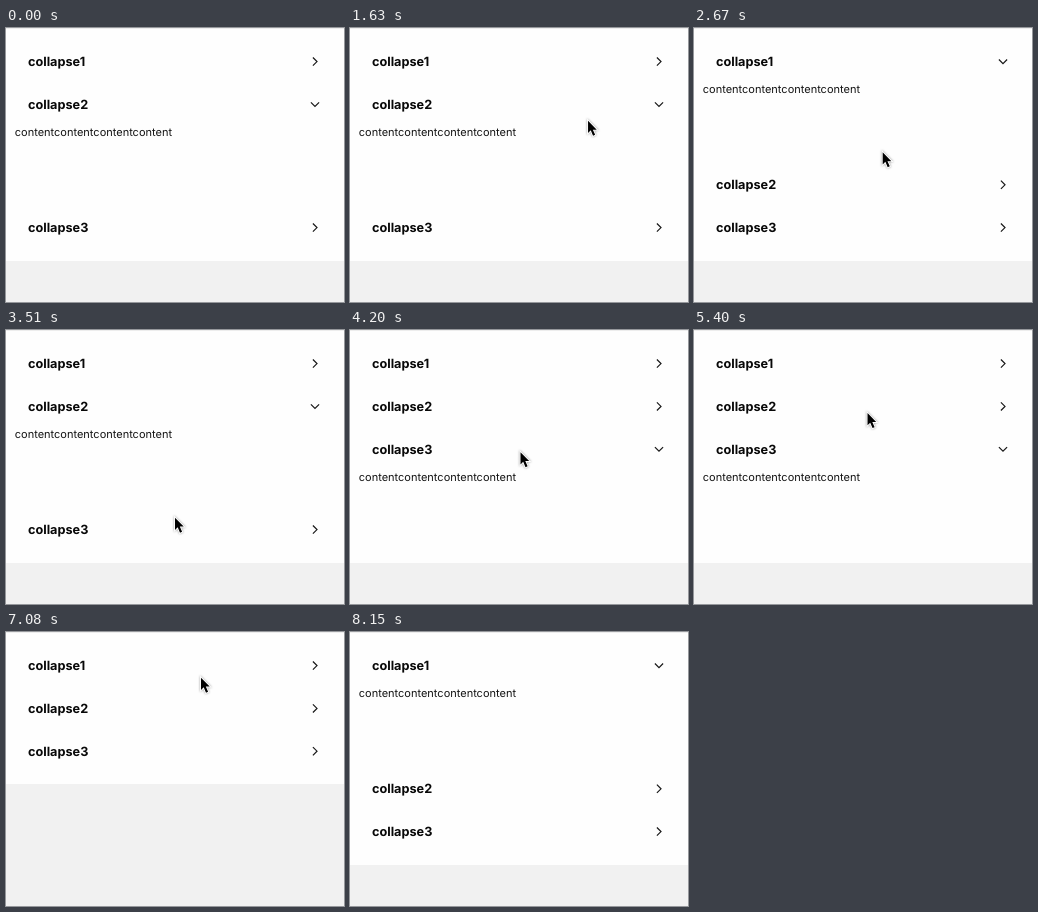
Animation, 338 px wide and 274 px high, one loop 8890 ms. Source, as an HTML page:

```html
<!DOCTYPE html>
<html lang="en">
<head>
<meta charset="utf-8">
<title>Collapse panels</title>
<style>
  html, body { margin: 0; width: 100%; height: 100%; overflow: hidden; background: #f1f1f1; }
  svg { display: block; }
  text { font-family: Inter, "Open Sans", sans-serif; text-rendering: geometricPrecision; }
  .title { font-size: 12.7px; font-weight: 700; fill: #080808; }
  .content { font-size: 11px; fill: #141414; }
  .chevron { fill: none; stroke: #181818; stroke-width: 1.2; }
  #cursor { filter: drop-shadow(0 .8px .8px rgba(0, 0, 0, .4)); }
</style>
</head>
<body>
<svg width="338" height="274" viewBox="0 0 338 274">
  <rect width="338" height="274" fill="#f1f1f1"/>
  <rect id="card" width="338" height="233" fill="#fefefe"/>
  <rect width="338" height="1" fill="#ededed"/>
  <g id="panels"></g>
  <path id="cursor" d="M.5 1.2v12.2l2.7-2.6l2.3 5.4l2.1-.9l-2.3-5.2h3.9z"
        fill="#000" stroke="#fff" stroke-width="1.8" paint-order="stroke"/>
</svg>
<script>
const LOOP = 8890;
const PAD = 12, HEADER = 42.8, BODY = 80.4;
const DURATION = 280, CLOSE_LAG = 17, MOVE_DELAY = 110;
const START_OPEN = 1;

// Each click toggles a panel; the pointer then glides to its next resting place.
const REST = [209.5, 41.5];
const steps = [
  { click: 2205, panel: 0, arrive: 2810, to: [184, 139] },
  { click: 3025, panel: 1, arrive: 3510, to: [168.5, 186.5] },
  { click: 3755, panel: 2, arrive: 4200, to: [170, 121] },
  { click: 4445, panel: 2, arrive: 4910, to: [171, 105.5] },
  { click: 5125, panel: 2, arrive: 5510, to: [174, 70.5] },
  { click: 5725, panel: 1, arrive: 6140, to: [176, 66.5] },
  { click: 6405, panel: 1, arrive: 7080, to: [194.5, 44.5] },
  { click: 7265, panel: 0, arrive: 7265, to: [194.5, 44.5] }
];
const enter = { start: 1100, end: 1930, from: [288, 270], bend: [266, 126], to: REST };
const leave = { start: 7660, end: 8200, from: [194.5, 44.5], bend: [255, 190], to: [313, 290] };

const byId = id => document.getElementById(id);
const card = byId("card"), cursor = byId("cursor");

byId("panels").innerHTML = [1, 2, 3].map(n => `
  <g class="panel">
    <text class="title" x="22" y="26">collapse${n}</text>
    <path class="chevron" d="M-2.1 -4.1L2 0L-2.1 4.1"/>
    <svg class="body" y="${HEADER}" width="338" height="0" overflow="hidden">
      <text class="content" x="8.8" y="10.3">${"content".repeat(4)}</text>
    </svg>
  </g>`).join("");

const panels = [...document.querySelectorAll(".panel")].map(root => ({
  root,
  chevron: root.querySelector(".chevron"),
  body: root.querySelector(".body")
}));

// cubic-bezier(.42, 0, .58, 1), solved by bisection
function ease(x) {
  if (x <= 0) return 0;
  if (x >= 1) return 1;
  let lo = 0, hi = 1, s = .5;
  for (let i = 0; i < 20; i++) {
    s = (lo + hi) / 2;
    const bx = 1.26 * s * (1 - s) ** 2 + 1.74 * s * s * (1 - s) + s ** 3;
    if (bx < x) lo = s; else hi = s;
  }
  return s * s * (3 - 2 * s);
}

const progress = (t, start, end) => ease((t - start) / (end - start));
const mix = (a, b, k) => a.map((v, i) => v + (b[i] - v) * k);

// How far each panel is open, 0 to 1; only one stays open.
function openness(t) {
  let open = START_OPEN, previous = open, since = -LOOP;
  for (const { click, panel } of steps) {
    if (click > t) break;
    previous = open;
    open = open === panel ? -1 : panel;
    since = click;
  }
  const opening = ease((t - since) / DURATION);
  const closing = ease((t - since - CLOSE_LAG) / DURATION);
  return panels.map((_, i) =>
    i === open ? opening : i === previous ? 1 - closing : 0);
}

function arc({ start, end, from, bend, to }, t) {
  const k = progress(t, start, end);
  return mix(mix(from, bend, k), mix(bend, to, k), k);
}

function pointer(t) {
  if (t < enter.start || t >= leave.end) return null;
  if (t < enter.end) return arc(enter, t);
  if (t >= leave.start) return arc(leave, t);
  return steps.reduce((at, { click, arrive, to }) =>
    t < click ? at : mix(at, to, progress(t, click + MOVE_DELAY, Math.max(arrive, click + DURATION))), REST);
}

function draw(t) {
  let y = PAD;
  openness(t).forEach((amount, i) => {
    const { root, chevron, body } = panels[i];
    root.setAttribute("transform", `translate(0 ${y})`);
    chevron.setAttribute("transform", `translate(309 21.6) rotate(${90 * amount})`);
    body.setAttribute("height", BODY * amount);
    y += HEADER + BODY * amount;
  });
  card.setAttribute("height", Math.round(y + PAD));

  const tip = pointer(t);
  cursor.setAttribute("visibility", tip ? "visible" : "hidden");
  if (tip) cursor.setAttribute("transform", `translate(${tip})`);
}

function tick() {
  draw(performance.now() % LOOP);
  requestAnimationFrame(tick);
}
tick();
</script>
</body>
</html>
```
